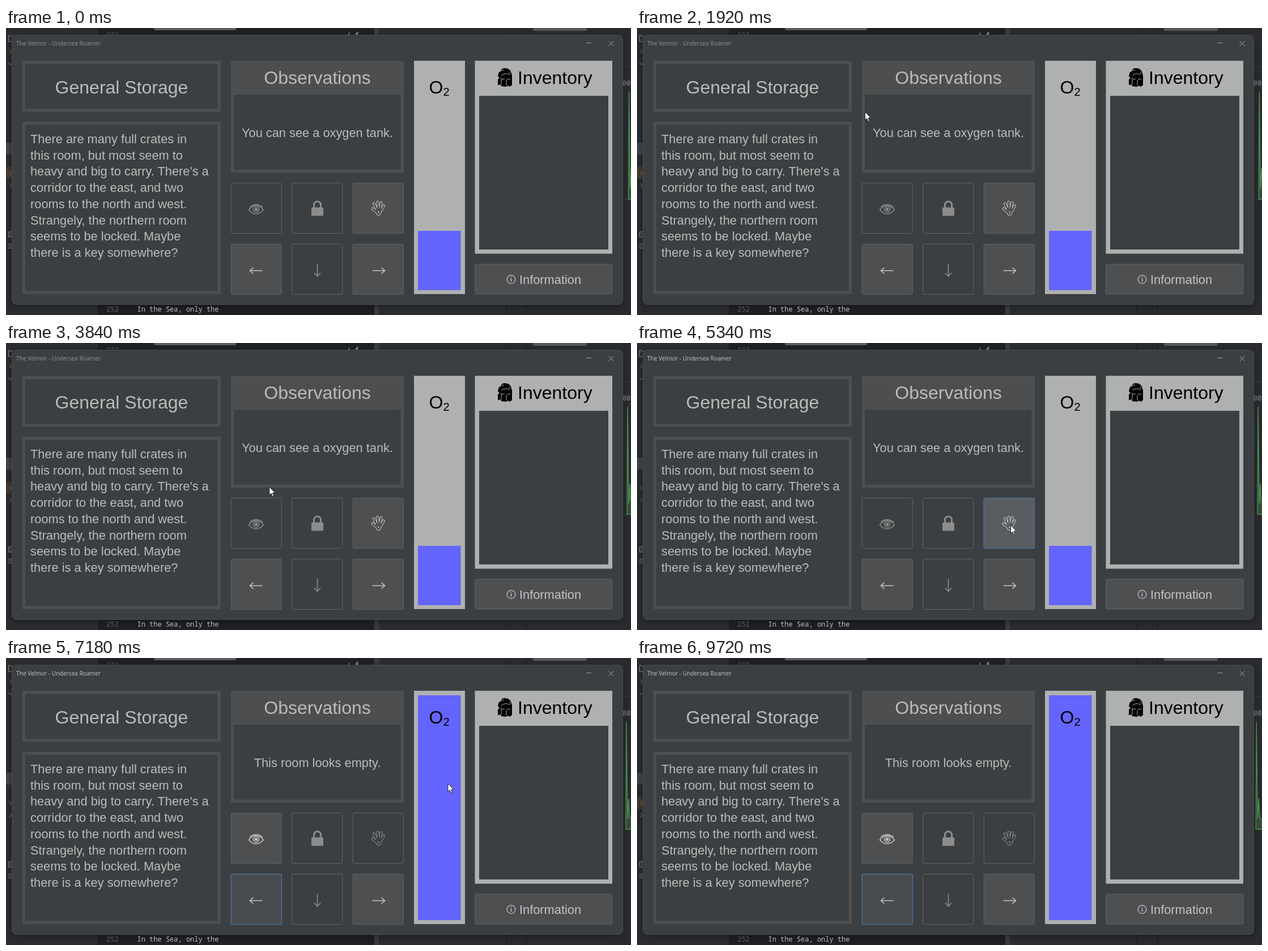
An HTML page for the animation above (9790 ms loop, 1103 by 508 pixels).

```html
<!DOCTYPE html>
<html lang="en">
<head>
<meta charset="utf-8">
<title>The Velmor - Undersea Roamer</title>
<style>
  html, body { margin: 0; width: 100%; height: 100%; overflow: hidden; background: #1e1f22; }
  svg { display: block; width: 1103px; height: 508px; }
  text { font-family: "Liberation Sans", Arial, sans-serif; fill: #bbb; white-space: pre; }
  .big { font-size: 32px; }
  .body { font-size: 21.8px; }
  .mid { text-anchor: middle; }
  .mono { font: 12px "Noto Sans Mono", monospace; fill: #bcbec4; }
  .dim { fill: #5a5d63; }
  .title { font: 10.2px "Open Sans", sans-serif; fill: #929394; }
  .active .title { fill: #c4c4c4; }
  .black { fill: #000; }
  .frame { fill: #4d4e50; }
  .light { fill: #afb1b1; }
  .inner { fill: #3c3f41; }
  .line { fill: none; stroke: #8d8e90; }

  .btn { --face: #3c3f41; --ink: #8c8c8c; }
  .btn.on { --face: #4d4f51; --ink: #c3c4c5; }
  .btn.focus { --face: #484b4e; }
  .btn.hover { --face: #5a5d60; }
  .btn .face { fill: var(--face); stroke: #606364; }
  .btn.focus .face { stroke: #466d94; stroke-width: 1.7; }
  .btn.hover .face { stroke: #466d94; }
  .btn .ink { fill: none; stroke: var(--ink); stroke-width: 1.6; }
  .btn .solid { fill: var(--ink); stroke: none; }
  .btn .fill { fill: none; stroke: var(--face); }
  .btn text { fill: var(--ink); }
</style>
</head>
<body>
<svg id="stage" viewBox="0 0 1103 508">
  <defs>
    <filter id="blur" x="-5%" y="-10%" width="110%" height="120%"><feGaussianBlur stdDeviation="6"/></filter>
    <g id="fingers" stroke-linecap="round" stroke-linejoin="round">
      <path d="M655 323L649.500 311M657 322L656 308.500M659.500 322L662 309.500M661 324L666.500 315M655 326L647 320"/>
    </g>
    <g id="arrow"><path d="M-11 0H11M-5-5.500L-11 0L-5 5.500"/></g>
  </defs>

  <!-- editor behind the window -->
  <rect width="1103" height="508" fill="#1f2023"/>
  <rect width="162" height="508" fill="#2a2c2f"/>
  <rect x="650" width="8" height="508" fill="#393b3e"/>
  <rect x="658" width="224" height="508" fill="#2a2c2f"/>
  <rect x="883" width="35" height="508" fill="#292b2e"/>
  <rect x="919" width="184" height="508" fill="#292b2e"/>
  <path d="M882.500 0V508M918.500 0V508" stroke="#1a1b1d"/>
  <path d="M1088 303.500H1103M1088 68.500H1103" stroke="#3d4043"/>
  <rect x="261" y="-3" width="145" height="7" rx="3" fill="#5b5d60"/>
  <rect x="930" y="-1" width="95" height="6" rx="3" fill="#55575a"/>
  <rect y="203" width="12" height="21" fill="#43454a"/>
  <rect id="brownRow" y="246" width="12" height="21" fill="#463a30"/>
  <g class="line">
    <path d="M12 14.500H8.500L7 13H4.500V24H12"/>
    <path d="M6 38L9.500 41.500L6 45M4 61L8 65L12 61M6 253.500L9.500 257L6 260.500M6 275L9.500 278.500L6 282M4.500 361H8V370H4.500ZM8 359.500H12V370H8M4 382.500H11M4 386H11M4 389.500H11"/>
  </g>
  <text class="mono dim" x="177" y="17">222</text>
  <text class="mono" x="601" y="17">/ f</text>
  <text class="mono" x="1088" y="102" style="fill:#85878b">00</text>
  <path id="graph" d="M-1 303L0 113L2 285L4 249L5.500 280L10 288L20 290V303Z" fill="#4f8d5455" stroke="#4e9652" stroke-width="1.400"/>
  <rect x="10" y="18" width="1078" height="474" rx="9" opacity=".4" filter="url(#blur)"/>
  <text class="mono dim" x="177" y="502">252</text>
  <text class="mono" x="231.500" y="502">In the Sea, only the</text>

  <!-- game window -->
  <g id="win">
    <rect x="10.500" y="12.500" width="1078" height="477" rx="8" fill="#3c3f41" stroke="#494c4e"/>
    <text class="title" x="18" y="31">The Velmor - Undersea Roamer</text>
    <path class="line" d="M1024 26.500H1033M1063.500 23L1072.500 32M1072.500 23L1063.500 32" style="stroke:#a5a6a7"/>

    <rect class="frame" x="29" y="58" width="350" height="90"/>
    <rect class="inner" x="34" y="64" width="339.500" height="79"/>
    <text class="big mid" x="204" y="116">General Storage</text>

    <rect class="frame" x="29" y="166" width="350" height="305"/>
    <rect class="inner" x="34" y="171.500" width="339.500" height="294"/>
    <g id="story"></g>

    <rect class="frame" x="397" y="58" width="305" height="198"/>
    <rect class="inner" x="402" y="118" width="294.500" height="132.500"/>
    <text class="big mid" x="549.500" y="98.500">Observations</text>
    <text class="body mid" id="seen" x="549.500" y="193"></text>

    <rect class="light" x="720" y="58" width="90" height="413"/>
    <rect id="oxygen" x="727" width="75.500" fill="#6464ff"/>
    <text class="big black" x="746.500" y="116">O<tspan font-size="20" dy="4">2</tspan></text>

    <rect class="light" x="827.500" y="58" width="242.500" height="341.500"/>
    <rect class="inner" x="835" y="120" width="228" height="272"/>
    <text class="big black" x="903" y="98.500">Inventory</text>
    <path d="M873 77Q874 71 880 71Q888 71 891 77L893 84V101L889 104L886 102L882 104L874 103L873 100L868 101V91L871 89L868 85L870 78Z"/>
    <path class="line" d="M874 76Q876 73 879 75M874 84Q882 78 889 83M875 91L880 90M884 90L890 91M874 88V100M883 92V101M888 77L890 81" style="stroke:#afb1b1"/>

    <g id="buttons"></g>
  </g>

  <path id="cursor" d="M.5.5V15L3.700 12L6 17.500L8.300 16.500L6 11.200H10.500Z" fill="#fff" stroke="#111" stroke-width=".9"/>
</svg>

<script>
const LOOP = 9790, ACTIVATED = 5240, TAKEN = 5410, LEFT = 9720;
const $ = id => document.getElementById(id);

const story = ["There are many full crates in", "this room, but most seem to",
  "heavy and big to carry. There's a", "corridor to the east, and two", "rooms to the north and west.",
  "Strangely, the northern room", "seems to be locked. Maybe", "there is a key somewhere?"];
$("story").innerHTML = story.map((line, i) =>
  `<text class="body" x="43" y="${204 + i * 28.7}">${line}</text>`).join("");

const arrow = (x, y, turn) =>
  `<use href="#arrow" class="ink" transform="translate(${x} ${y}) rotate(${turn})"/>`;

const buttons = {
  look: { x: 397, y: 274, icon: `
    <path class="ink" d="M428.500 322Q441 306 454.500 322Q441 336 428.500 322Z"/>
    <path class="ink" d="M430 317Q441 308 453 317" stroke-width="1"/>
    <circle class="ink" cx="441.500" cy="321" r="5"/><circle class="solid" cx="441.500" cy="321" r="2.700"/>` },
  lock: { x: 504.5, y: 274, icon: `
    <rect class="solid" x="539" y="317.500" width="21" height="15" rx="1.500"/>
    <path class="ink" d="M543.500 318V312.500A6 5.500 0 0 1 555.500 312.500V318" style="stroke-width:3"/>` },
  take: { x: 612, y: 274, icon: `
    <g class="ink" style="stroke-width:5"><use href="#fingers"/><ellipse cx="657.500" cy="326" rx="2.500" ry="3.500"/></g>
    <g class="fill" stroke-width="3"><use href="#fingers"/><ellipse cx="657.500" cy="326" rx="2.500" ry="3.500"/></g>` },
  west: { x: 397, y: 382, icon: arrow(441.5, 429.5, 0) },
  down: { x: 504.5, y: 382, icon: arrow(549.5, 428.5, -90) },
  east: { x: 612, y: 382, icon: arrow(657.5, 429.5, 180) },
  info: { x: 827.5, y: 417.5, w: 242, h: 53, icon: `
    <circle class="ink" cx="891.500" cy="445" r="7.300" style="stroke-width:1.300"/>
    <path class="ink" d="M891.500 443.500V449M891.500 440.500V442"/>
    <text class="body" x="906" y="453">Information</text>` }
};
for (const [name, b] of Object.entries(buttons)) {
  b.w ??= 89;
  b.h ??= 89;
  $("buttons").insertAdjacentHTML("beforeend", `<g class="btn" id="${name}">
    <rect class="face" x="${b.x + .25}" y="${b.y + .5}" width="${b.w}" height="${b.h}" rx="2"/>${b.icon}</g>`);
}

// cursor route: time, x, y
const route = [
  [230, 905, 500], [570, 785, 348], [850, 785, 348], [1310, 616, 272], [1530, 616, 272],
  [1920, 402, 148], [2510, 400, 132], [2900, 371, 83], [3490, 397, 160], [3840, 464, 254],
  [4300, 625, 344], [4580, 659, 322], [6090, 659, 322], [6160, 703, 307], [6400, 715, 350],
  [6750, 727, 175], [7120, 763, 252], [7390, 836, 118], [7550, 836, 118], [7900, 772, 180],
  [8340, 912, 211], [8550, 915, 240], [8740, 904, 270], [8900, 904, 270], [9370, 985, 508]
];

function cursorAt(t) {
  const i = route.findIndex(p => p[0] > t);
  if (i < 1) return null;
  const [a, b] = [route[i - 1], route[i]];
  const k = (t - a[0]) / (b[0] - a[0]);
  return { x: a[1] + (b[1] - a[1]) * k, y: a[2] + (b[2] - a[2]) * k };
}

function draw(t) {
  const taken = t >= TAKEN, cursor = cursorAt(t);
  const enabled = ["west", "east", "info", taken ? "look" : "take"];
  const focused = taken ? "west" : t >= ACTIVATED ? "take" : "";

  $("win").classList.toggle("active", t >= ACTIVATED);
  $("brownRow").style.opacity = t < ACTIVATED || t >= LEFT ? 1 : 0;
  $("seen").textContent = taken ? "This room looks empty." : "You can see a oxygen tank.";
  const top = taken ? 66 : 359;
  $("oxygen").setAttribute("y", top);
  $("oxygen").setAttribute("height", 464 - top);
  $("graph").setAttribute("transform", `translate(${1099.5 - t * .00065} 0)`);

  for (const [name, b] of Object.entries(buttons)) {
    const on = enabled.includes(name);
    const over = cursor && cursor.x >= b.x && cursor.x < b.x + b.w && cursor.y >= b.y && cursor.y < b.y + b.h;
    const list = $(name).classList;
    list.toggle("on", on);
    list.toggle("focus", name === focused);
    list.toggle("hover", !!(on && over));
  }

  $("cursor").style.display = cursor ? "" : "none";
  if (cursor) $("cursor").setAttribute("transform", `translate(${cursor.x} ${cursor.y})`);
}

const start = performance.now();
function tick() {
  draw((performance.now() - start) % LOOP);
  requestAnimationFrame(tick);
}
tick();
</script>
</body>
</html>
```
